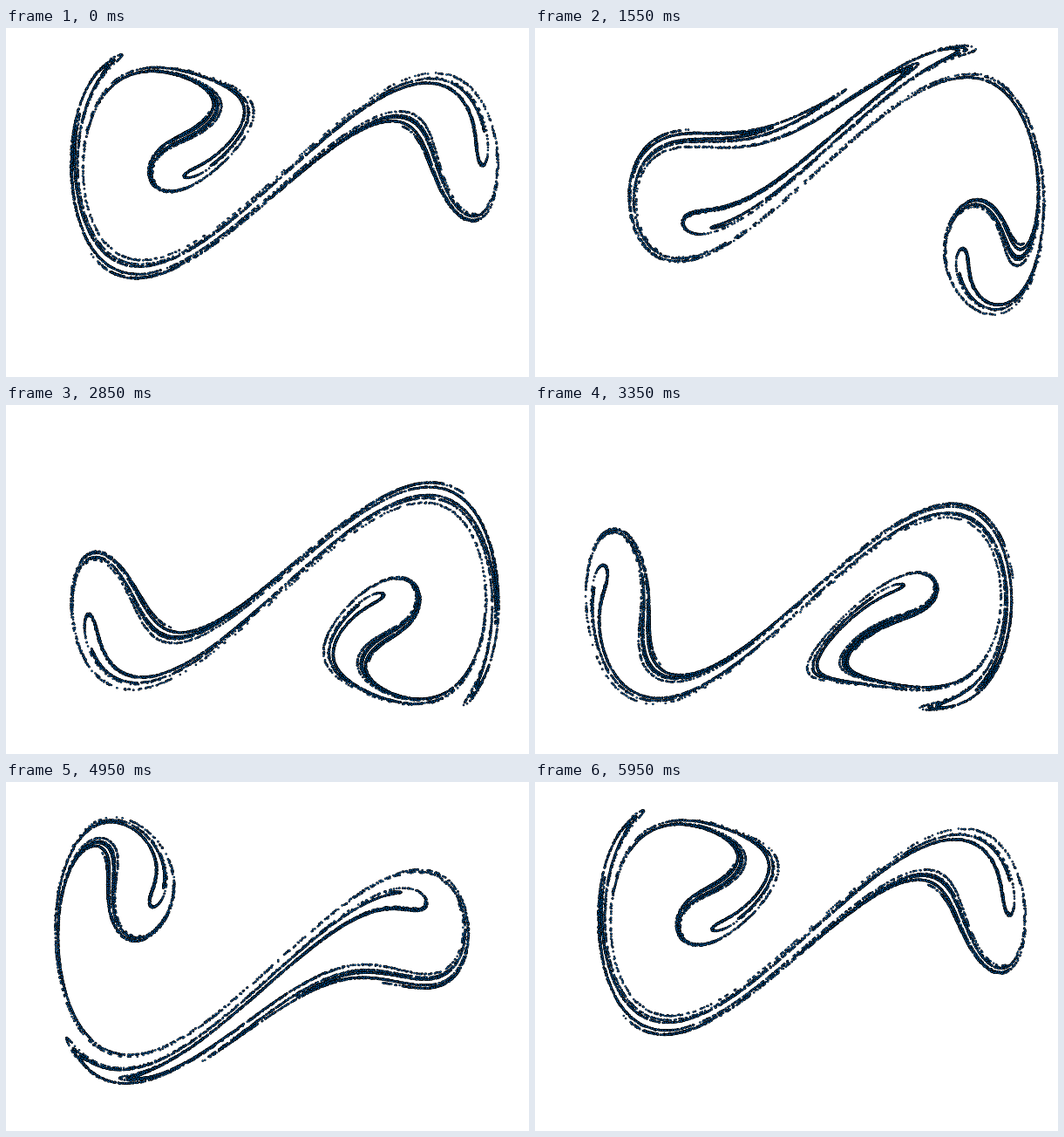
Animation, 600 px wide and 400 px high, one loop 6000 ms. Source, as an HTML page with a canvas:

```html
<!DOCTYPE html>
<html lang="en">
<head>
<meta charset="utf-8">
<title>Forced double-well oscillator</title>
<style>
  html, body { margin: 0; width: 100%; height: 100%; overflow: hidden; background: #fff; }
  canvas { display: block; }
</style>
</head>
<body>
<canvas id="stage" width="600" height="400"></canvas>
<script>
// Stroboscopic sections of x'' = x - x^3 - DAMP x' + DRIVE cos t
const DAMP = 0.2, DRIVE = 0.3;
const STEPS = 120, STEP_MS = 50, DT = 2 * Math.PI / STEPS;
const STARTS = 200, SETTLE = 10, KEEP = 50, COUNT = STARTS * KEEP;
const SCALE = 180, CX = 317, CY = 192;
const RIM = 1.3, CORE = 0.65;

const accel = (x, v, t) => x - x * x * x - DAMP * v + DRIVE * Math.cos(t);

// One Runge-Kutta step
function advance(x, v, t) {
  const h = DT / 2;
  const a1 = accel(x, v, t);
  const v2 = v + h * a1, a2 = accel(x + h * v, v2, t + h);
  const v3 = v + h * a2, a3 = accel(x + h * v2, v3, t + h);
  const v4 = v + DT * a3, a4 = accel(x + DT * v3, v4, t + DT);
  return [
    x + DT / 6 * (v + 2 * v2 + 2 * v3 + v4),
    v + DT / 6 * (a1 + 2 * a2 + 2 * a3 + a4)
  ];
}

// sections[step] holds the centre of every dot at that phase
const sections = Array.from({ length: STEPS }, () => new Float32Array(COUNT * 2));
for (let i = 0; i < STARTS; i++) {
  let x = 1.2 * (2 * (i + 0.5) / STARTS - 1), v = 0.3 * Math.sin(i * 2.4);
  for (let turn = -SETTLE; turn < KEEP; turn++) {
    for (let step = 0; step < STEPS; step++) {
      if (turn >= 0) {
        const at = 2 * (turn * STARTS + i);
        sections[step][at] = CX + SCALE * x;
        sections[step][at + 1] = CY - SCALE * v;
      }
      [x, v] = advance(x, v, step * DT);
    }
  }
}

const ctx = document.getElementById("stage").getContext("2d");
let shown = -1;

function disc(x, y, r, color) {
  ctx.fillStyle = color;
  ctx.beginPath();
  ctx.arc(x, y, r, 0, 7);
  ctx.fill();
}

function draw(now) {
  const step = Math.floor(now / STEP_MS) % STEPS;
  if (step !== shown) {
    shown = step;
    ctx.clearRect(0, 0, 600, 400);
    const dots = sections[step];
    for (let k = 0; k < dots.length; k += 2) {
      disc(dots[k], dots[k + 1], RIM, "#000");
      disc(dots[k], dots[k + 1], CORE, "#0090ff");
    }
  }
  requestAnimationFrame(draw);
}
requestAnimationFrame(draw);
</script>
</body>
</html>
```
